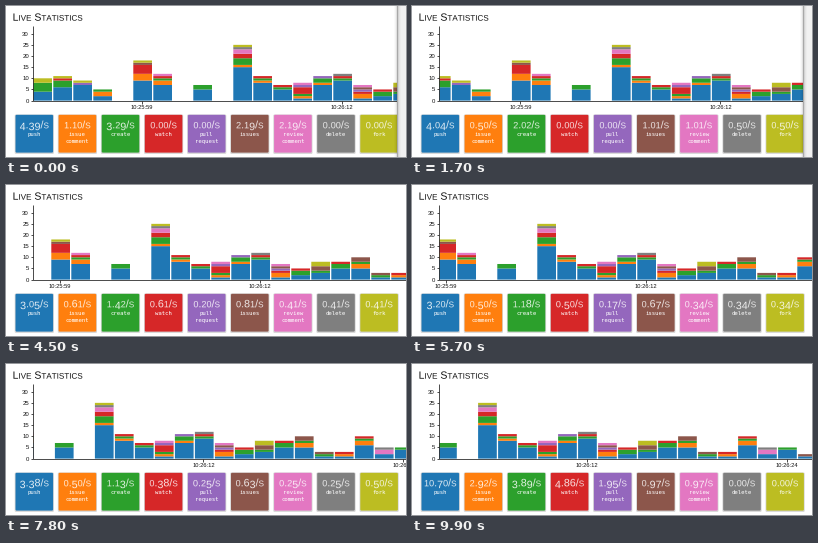
Animation, 400 px wide and 151 px high, one loop 10000 ms. Source, as a matplotlib script:

```python
import matplotlib.pyplot as plt
from matplotlib.animation import FuncAnimation
from matplotlib.patches import FancyBboxPatch, PathPatch, Rectangle
from matplotlib.path import Path
from matplotlib.textpath import TextPath
import numpy as np

W, H, DPI = 400, 151, 100
PT = 72 / DPI  # points per pixel
FRAMES, INTERVAL = 100, 100

NAMES = ["push", "issue\ncomment", "create", "watch", "pull\nrequest",
         "issues", "review\ncomment", "delete", "fork"]
COLORS = ["#1f77b4", "#ff7f0e", "#2ca02c", "#d62728", "#9467bd",
          "#8c564b", "#e377c2", "#7f7f7f", "#bcbd22"]

# Chart geometry
LEFT, BASE, UNIT = 27.3, 94.6, 2.23
PITCH, BAR_W = 20, 18.7

# Height and push share of each bar; the other events split the rest at random
HEIGHTS = [10, 11, 9, 5, 0, 18, 12, 0, 7, 0, 25, 11, 7, 8, 11, 12, 7, 5, 8, 8,
           10, 3, 3, 10, 5, 5, 2]
PUSHES = [4, 6, 7, 2, 0, 9, 7, 0, 5, 0, 15, 8, 5, 1, 7, 9, 1, 2, 3, 5, 5, 1, 1,
          6, 2, 4, 1]
WEIGHTS = np.array([4, 5, 4, 1.5, 2.5, 2, 0.3, 2.5])

# Moments when a new bar arrives; each pushes the chart on for one second
ARRIVALS = np.array([0, 1.33, 2.4, 3.4, 4.4, 5.6, 6.88, 8.6, 9.84])
PANEL_X, PANEL_GONE = 391, 3.9

# Key points of the counters: update number, seconds counted, events counted
UPDATES = [1, 2, 4, 5, 8]
SECONDS = [0.912, 1.981, 3.955, 4.925, 7.99]
COUNTS = np.array([
    [4, 1, 3, 0, 0, 2, 2, 0, 0],
    [8, 1, 4, 0, 0, 2, 2, 1, 1],
    [12, 2, 4, 1, 0, 3, 2, 1, 2],
    [15, 3, 7, 3, 1, 4, 2, 2, 2],
    [27, 4, 9, 3, 2, 5, 2, 2, 4],
])
RESTART = 1.028, [11, 3, 4, 5, 2, 1, 1, 0, 0]

SANS = {"family": "Liberation Sans"}


def glyph(char):
    """Outline and advance of one character, in hundredths of an em."""
    def outline(s):
        return TextPath((0, 0), s, size=100, prop=SANS)
    bar = outline("|").get_extents().x1
    advance = outline(char + "|").get_extents().x1 - bar
    return (None if char == " " else outline(char)), advance


GLYPHS = {c: glyph(c) for c in "0123456789./ LIVESTAC"}


def small_caps(text, x, y, size, centered=False):
    """Path of text in small capitals with old-style figures."""
    parts, pen = [], 0
    for c in text:
        scale = 0.77 if c.islower() else 0.85 if c in "012" else 1
        drop = 17 if c in "34579" else 0
        shape, advance = GLYPHS[c.upper()]
        if shape is not None:
            v = shape.vertices * scale
            pts = np.column_stack([pen + v[:, 0], drop - v[:, 1]])
            parts.append((pts * size / 100, shape.codes))
        pen += advance * scale
    start = x - pen * size / 200 if centered else x
    verts = np.concatenate([p for p, _ in parts]) + [start, y]
    return Path(verts, np.concatenate([c for _, c in parts]))


def rate_path(count, seconds, x):
    return small_caps(f"{count / seconds:.2f}/s", x, 122.3, 10.7,
                      centered=True)


fig = plt.figure(figsize=(W / DPI, H / DPI), dpi=DPI, facecolor="white")
ax = fig.add_axes([0, 0, 1, 1])
ax.set_xlim(0, W)
ax.set_ylim(H, 0)
ax.axis("off")


def line(xs, ys):
    return ax.plot(xs, ys, color="#222222", lw=0.8 * PT, zorder=3,
                   solid_capstyle="butt")[0]


def box(x, y, w, h, color, **style):
    return ax.add_patch(Rectangle((x, y), w, h, fc=color, lw=0, snap=False,
                                  **style))


def label(x, y, text, size, **style):
    style = {"color": "#111111", "ha": "center", "va": "center",
             "family": "Liberation Sans", **style}
    return ax.text(x, y, text, fontsize=size * PT, **style)


# Title and axes
ax.add_patch(PathPatch(small_caps("Live Statistics", 6.6, 14.7, 10.5),
                       fc="#111111", lw=0))
line([27, 27], [20, 95])
line([27, W], [94.8, 94.8])
for value in range(0, 31, 5):
    y = BASE - value * UNIT
    line([24.5, 27], [y, y])
    label(23, y, str(value), 6, ha="right", va="center_baseline")

# Stacked bars
rng = np.random.default_rng(12)
bars = []
for j, (height, pushes) in enumerate(zip(HEIGHTS, PUSHES)):
    others = rng.multinomial(height - pushes, WEIGHTS / WEIGHTS.sum())
    y = BASE
    for count, color in zip([pushes, *others], COLORS):
        if count:
            y -= count * UNIT
            bars.append((j, box(0, y, BAR_W, count * UNIT, color)))

ticks = [(j, line([0, 0], [95, 97.5]), label(0, 101.3, text, 5.8))
         for j, text in [(5, "10:25:59"), (15, "10:26:12"), (25, "10:26:24")]]

# Rate cards
rates = []
for i, (name, color) in enumerate(zip(NAMES, COLORS)):
    x = 9.5 + 43.1 * i
    for grow, dy, fill, alpha in [(0.8, 0.5, "#777777", 0.3),
                                  (0, 0, color, 1)]:
        ax.add_patch(FancyBboxPatch(
            (x - grow, 108.8 + dy - grow), 37.6 + 2 * grow, 37.8 + 2 * grow,
            boxstyle="round,pad=0,rounding_size=1.2", fc=fill, lw=0,
            alpha=alpha, snap=False))
    middle = x + 18.8
    for row, word in enumerate(name.split("\n")):
        label(middle, 129.6 + 7.3 * row, word, 5.6, color="white",
              va="baseline", family="DejaVu Sans Mono")
    rate = PathPatch(rate_path(0, 1, middle), fc="white", ec=color,
                     lw=0.12 * PT)
    rates.append((middle, ax.add_patch(rate)))

# Side panel with a soft shadow on both sides of its edge
panel = [box(PANEL_X, 0, W - PANEL_X, H, "#f1f1f1", zorder=5)]
for dx in range(-3, 4):
    panel.append(box(PANEL_X + dx, 0, 1, H, "black", zorder=5,
                     alpha=0.3 * np.exp(-0.9 * abs(dx))))


def tally(t):
    """Seconds and event counts on display at time t."""
    update = int(t + 0.2 + 1e-6) + 1
    if update > 9:  # counting starts afresh
        return RESTART
    update = min(update, UPDATES[-1])
    counts = [int(np.interp(update, UPDATES, c)) for c in COUNTS.T]
    return np.interp(update, UPDATES, SECONDS), counts


def draw(frame):
    t = frame * INTERVAL / 1000
    shift = PITCH * np.clip(t - ARRIVALS, 0, 1).sum()

    for j, rect in bars:
        x = LEFT + PITCH * j - shift
        left = max(x, LEFT)
        rect.set_x(left)
        rect.set_width(max(x + BAR_W - left, 0))

    for j, mark, text in ticks:
        x = LEFT + PITCH * j + 8.5 - shift
        mark.set_xdata([x, x])
        text.set_x(x)
        for artist in (mark, text):
            artist.set_visible(LEFT < x < W + 15)

    seconds, counts = tally(t)
    for (middle, rate), count in zip(rates, counts):
        rate.set_path(rate_path(count, seconds, middle))

    for part in panel:
        part.set_visible(t < PANEL_GONE)
    return []


anim = FuncAnimation(fig, draw, frames=FRAMES, interval=INTERVAL,
                     repeat=True, repeat_delay=0, blit=False)
plt.show()
```
